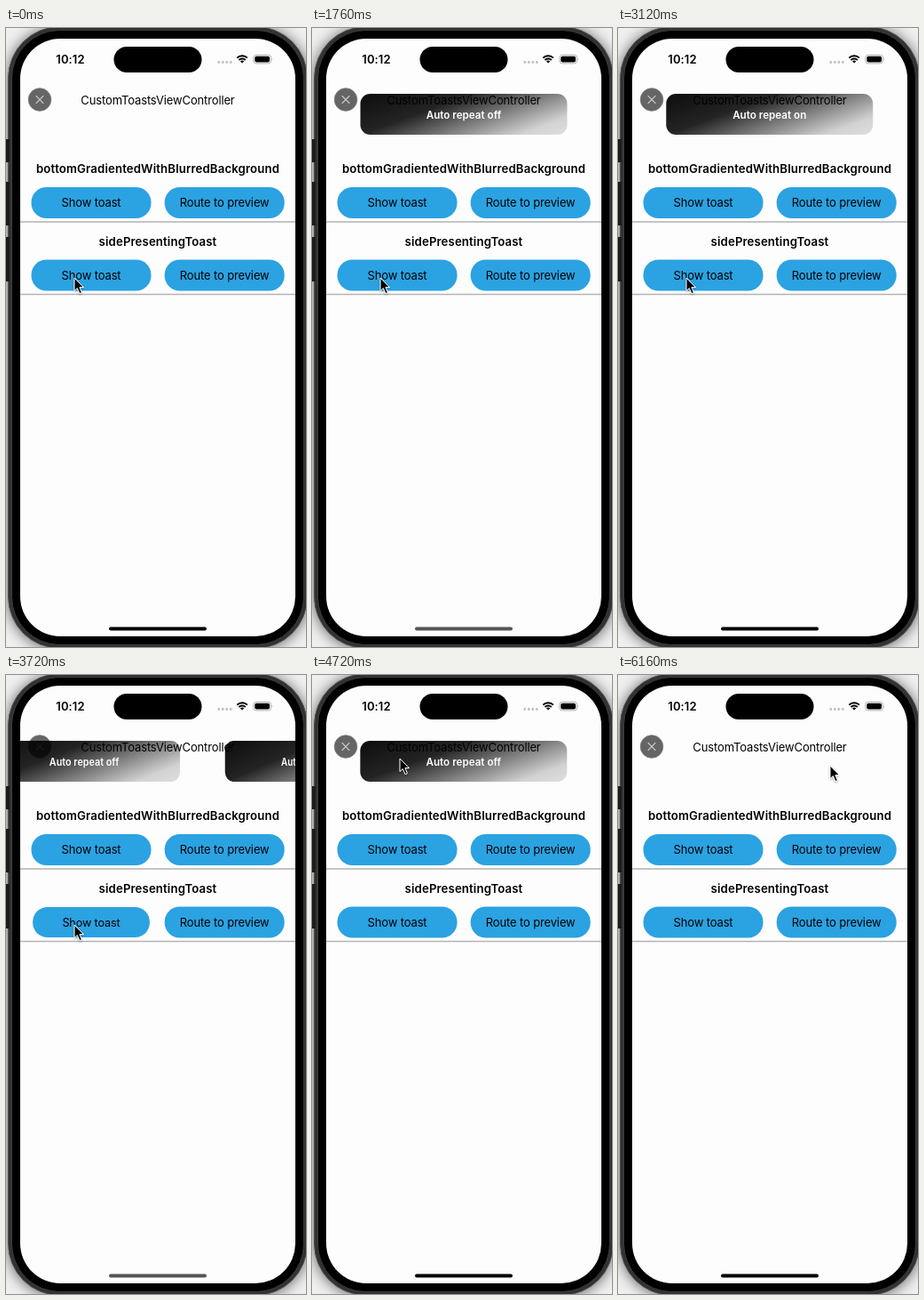
Animation of 338x696 px, one loop 6200 ms. Source, as an HTML page:

```html
<!DOCTYPE html>
<html lang="en">
<head>
<meta charset="utf-8">
<title>Toast demo</title>
<style>
  html, body { margin: 0; width: 100%; height: 100%; overflow: hidden; background: #f0f0f0; }
  svg { display: block; width: 338px; height: 696px; }
  text { font: 400 13px Inter, sans-serif; letter-spacing: -.14px; text-anchor: middle; }
  .bold { font-size: 13.2px; font-weight: 600; letter-spacing: .14px; }
  .clock { font-weight: 600; letter-spacing: .1px; }
  .toast text { font-size: 11.6px; font-weight: 600; letter-spacing: .04px; fill: #fff; }
</style>
</head>
<body>
<svg viewBox="0 0 338 696">
  <defs>
    <linearGradient id="fade" x1="0" y1="0" x2="1.193" y2=".642">
      <stop offset="0" stop-opacity=".95"/>
      <stop offset=".35" stop-opacity=".86"/>
      <stop offset=".85" stop-opacity=".17"/>
      <stop offset="1" stop-opacity=".12"/>
    </linearGradient>
    <clipPath id="screen"><rect x="16" y="12" width="310" height="672" rx="45"/></clipPath>
    <filter id="shadow" x="-50%" y="-50%" width="200%" height="200%">
      <feDropShadow dx="0" dy="1.2" stdDeviation="1" flood-opacity=".35"/>
    </filter>
    <filter id="glow">
      <feDropShadow dx="0" dy="1" stdDeviation="8" flood-opacity=".6"/>
    </filter>
    <g id="button"><rect x="-67.5" y="-17.5" width="135" height="35" rx="17" fill="#2ba2e2"/></g>
  </defs>

  <!-- phone body -->
  <rect x="2.5" y="-1.5" width="337" height="699" rx="58" fill="#303030" stroke="#555" filter="url(#glow)"/>
  <path d="M0 125h4v26h-4zM0 173h4v49h-4zM0 235h4v50h-4z" fill="#1c1c1c"/>
  <rect x="6.5" y="2.5" width="329" height="691" rx="54" fill="#000" stroke="#3f3f3f"/>
  <rect x="16" y="12" width="310" height="672" rx="45" fill="#fdfdfd"/>

  <!-- status bar -->
  <text class="clock" x="72.5" y="39.8">10:12</text>
  <rect x="121.5" y="21" width="99" height="29" rx="14.5"/>
  <path d="M239.8 38.5h.01M244.3 38.5h.01M248.8 38.5h.01M253.3 38.5h.01" stroke="#bdbdbd" stroke-width="2.8" stroke-linecap="round"/>
  <g fill="none" stroke="#000" stroke-width="1.9">
    <path d="M260.3 33.6a8.2 8.2 0 0 1 11.6 0M262.4 36a5.2 5.2 0 0 1 7.4 0"/>
    <path d="M264 37.6a3 3 0 0 1 4.2 0L266.1 39.6z" fill="#000" stroke="none"/>
  </g>
  <rect x="278.8" y="30.3" width="19.8" height="9.6" rx="3" fill="none" stroke="#aaa" stroke-width=".9"/>
  <rect x="280.3" y="31.7" width="16.8" height="6.8" rx="1.9"/>
  <path d="M299.8 33.6q1.3 1.5 0 3z" fill="#aaa"/>

  <!-- page -->
  <circle cx="38" cy="80.5" r="12.8" fill="#656565" stroke="#777" stroke-width=".8"/>
  <path d="M33.7 76.2l8.6 8.6m0-8.6l-8.6 8.6" stroke="#d0d0d0" stroke-width="1.2"/>
  <text x="171" y="85.6">CustomToastsViewController</text>
  <text class="bold" x="171" y="162.9">bottomGradientedWithBlurredBackground</text>
  <text class="bold" x="171" y="244.5">sidePresentingToast</text>
  <path d="M16 218h310M16 299.5h310" stroke="#b4b4b4" stroke-width="1.4"/>
  <g transform="translate(96 196.5)"><use href="#button"/><text y="4.6">Show toast</text></g>
  <g transform="translate(246.2 196.5)"><use href="#button"/><text y="4.6">Route to preview</text></g>
  <g id="press"><use href="#button"/><text y="4.6">Show toast</text></g>
  <g transform="translate(246.2 278)"><use href="#button"/><text y="4.6">Route to preview</text></g>
  <rect id="home" x="116" y="673.6" width="110" height="4" rx="2"/>

  <g id="toasts" clip-path="url(#screen)"></g>
  <path id="cursor" d="M0 0V14.6L3.3 11.5 5.9 17.6 8.4 16.5 5.9 10.6H10.5Z" stroke="#fff" stroke-width="1" filter="url(#shadow)"/>
</svg>
<script>
const LOOP = 6200, TRAVEL = 340, EXIT = 470;
const toasts = [
  { label: 'Auto repeat off', start: 392, end: 1910 },
  { label: 'Auto repeat on', start: 1910, end: 3482 },
  { label: 'Auto repeat off', start: 3482, end: 5500 },
];
const $ = id => document.getElementById(id);

$('toasts').innerHTML = toasts.map(toast => `<g class="toast">
  <rect x="-116.5" y="-23" width="233" height="46" rx="11" fill="url(#fade)"/>
  <text y="4.5">${toast.label}</text></g>`).join('');
toasts.forEach((toast, i) => toast.node = $('toasts').children[i]);

const ramp = (t, a, b) => Math.min(1, Math.max(0, (t - a) / (b - a)));
const smooth = (t, a, b) => { const p = ramp(t, a, b); return p * p * (3 - 2 * p); };

// Underdamped spring falling from 1 to 0
function spring(ms) {
  const angle = 6.25 * ms / 1000;
  return Math.exp(-.98 * angle) * (Math.cos(angle) + .98 * Math.sin(angle));
}

function drawToast({ node, start, end }, t) {
  const visible = t >= start && t < end + EXIT;
  node.style.display = visible ? '' : 'none';
  if (!visible) return;
  const shift = t < end ? -spring(t - start) : smooth(t, end, end + EXIT);
  // The width grows when the spring overshoots on entry
  const scale = t < end ? 1 + .3 * shift : 1 - .3 * shift;
  node.setAttribute('transform', `translate(${171 + TRAVEL * shift} 97) scale(${scale} 1)`);
}

function draw() {
  const t = performance.now() % LOOP;
  toasts.forEach(toast => drawToast(toast, t));

  const pressed = toasts.reduce((sum, { start }) =>
    sum + smooth(t, start, start + 100) - smooth(t, start + 130, start + 420), 0);
  $('press').setAttribute('transform', `translate(96 278) scale(${1 - .035 * pressed})`);

  const dim = smooth(t, 340, 440) - smooth(t, 2950, 3150) + smooth(t, 3400, 3500) - smooth(t, 4540, 4700);
  const grey = Math.round(85 * dim);
  $('home').setAttribute('fill', `rgb(${grey},${grey},${grey})`);

  const up = smooth(t, 4000, 4520), across = smooth(t, 5250, 5900);
  const x = 77 + 22 * up + 140 * across, y = 281 - 187 * up + 8 * across;
  $('cursor').setAttribute('transform', `translate(${x} ${y})`);
  requestAnimationFrame(draw);
}
draw();
</script>
</body>
</html>
```
